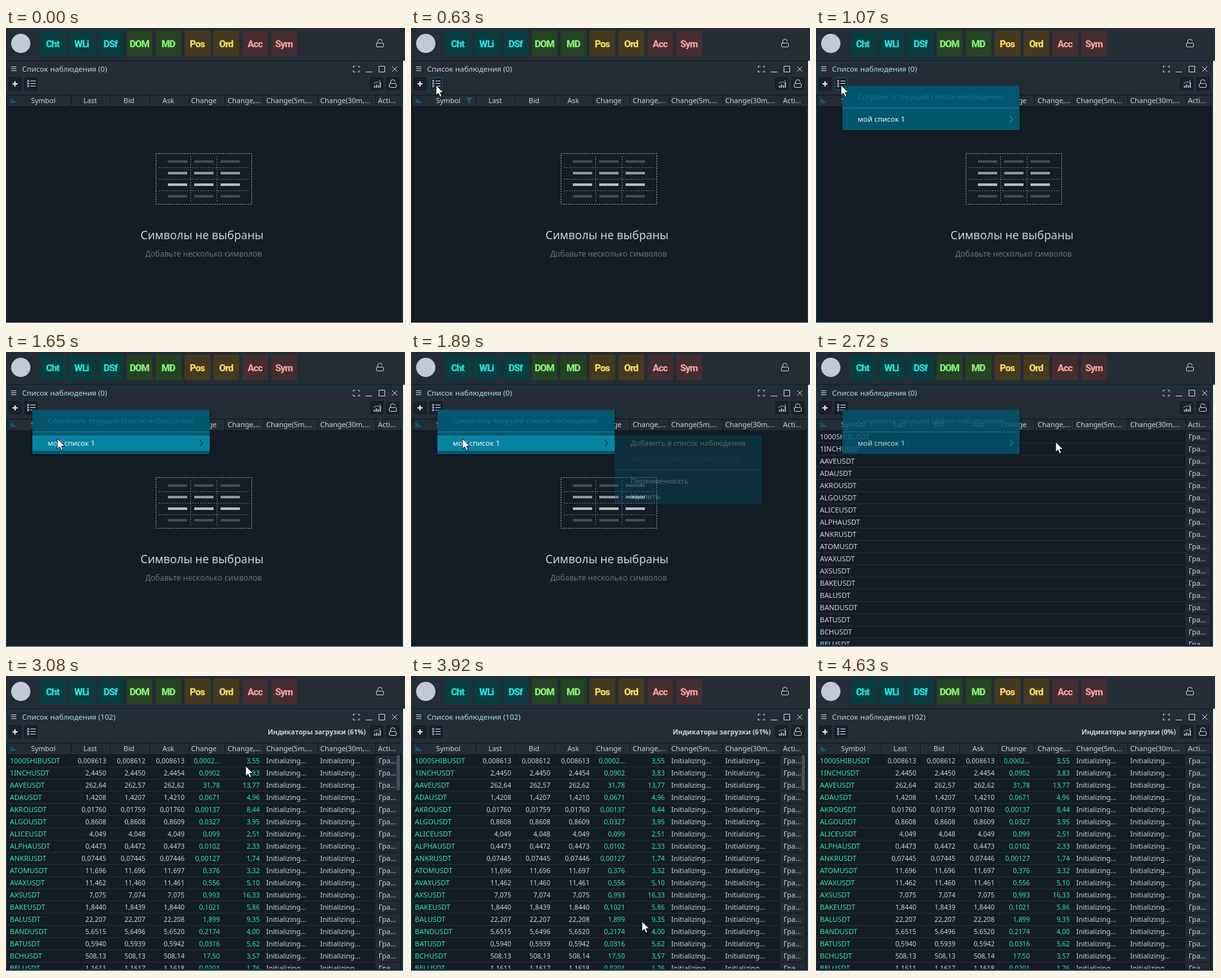
Write an HTML page that moves like this. It is 621 by 461 pixels and loops after 4.71 s.

```html
<!DOCTYPE html>
<html lang="ru">
<head>
<meta charset="utf-8">
<title>Список наблюдения</title>
<style>
html, body { margin: 0; width: 100%; height: 100%; overflow: hidden; background: #fff; }
svg { display: block; }
text { font: 11px "Noto Sans", sans-serif; fill: #cad3dd; white-space: pre; }
.app { font: 900 15px Roboto, sans-serif; letter-spacing: -1px; }
.number { font-size: 10.4px; }
.icon { fill: none; stroke: #c3cdd8; }
.off { fill: #0a7c99; font-size: 11.4px; }
.item { fill: #f2f8fa; font-size: 11.4px; font-weight: 500; }
</style>
</head>
<body>
<svg id="stage" width="621" height="461" viewBox="0 0 621 461"></svg>
<script>
const LOOP = 4710;
const NS = 'http://www.w3.org/2000/svg';
const BAR = '#242c36', BODY = '#141c25', EDGE = '#0f161e', LIGHT = '#cad3dd', GREEN = '#30e6ae';
const stage = document.getElementById('stage');

function add(parent, tag, attrs = {}, content) {
  const el = document.createElementNS(NS, tag);
  for (const key in attrs) el.setAttribute(key, attrs[key]);
  if (content !== undefined) el.textContent = content;
  return parent.appendChild(el);
}
const group = (parent = stage, attrs) => add(parent, 'g', attrs);
const box = (parent, x, y, width, height, fill, extra) =>
  add(parent, 'rect', { x, y, width, height, fill, ...extra });
const stroke = (parent, d, color, extra) =>
  add(parent, 'path', { d, fill: 'none', stroke: color, ...extra });
const label = (parent, x, y, content, extra) => add(parent, 'text', { x, y, ...extra }, content);
const show = (el, alpha) => el.setAttribute('opacity', Number(alpha));
const END = { 'text-anchor': 'end' }, MIDDLE = { 'text-anchor': 'middle' };

// Application bar
box(stage, 0, 0, 621, 51, BAR);
add(stage, 'circle', { cx: 23, cy: 24, r: 15, fill: '#c0cad6' });
const apps = [
  ['#0a3d40', '#25dedd', 'Cht', 'WLi', 'DSf'],
  ['#264224', '#82f472', 'DOM', 'MD'],
  ['#443a20', '#fdd663', 'Pos', 'Ord'],
  ['#432d30', '#f49d9d', 'Acc', 'Sym']
];
let appX = 53;
for (const [back, ink, ...names] of apps) {
  for (const name of names) {
    box(stage, appX, 4, 40, 40, back);
    label(stage, appX + 19.5, 29.5, name, { ...MIDDLE, class: 'app', style: `fill:${ink}` });
    appX += 45;
  }
}
function padlock(x, y) {
  box(stage, x - 5.5, y - .5, 11, 6, 'none', { class: 'icon', rx: 1.5 });
  stroke(stage, `M${x - 3.5} ${y - .5}v-2.500a3.500 3.500 0 0 1 7 0`, LIGHT);
}
padlock(582, 24);

// Window
box(stage, 0, 51, 618, 408, BAR);
box(stage, 1, 104, 615, 353, BODY);
stroke(stage, 'M0 51.5H618', '#10171f');
const frame = box(stage, .5, 52.5, 616, 405, 'none');
stroke(stage, 'M8 60.5h8m-8 3h8m-8 3h8', LIGHT);
const title = label(stage, 25, 68, '', { style: 'font-size:11.6px' });
stroke(stage, 'M540.5 62v-2.5h3m4 0h2.500v2.500m0 4v2.500h-2.500m-4 0h-3v-2.500M560 68.500h10M580.500 59.500h9v9h-9zM601 60l8 8m0-8l-8 8', LIGHT);

// Toolbar
for (const x of [4, 29, 567, 592])
  box(stage, x + .5, 77.5, 19, 19, '#19212b', { stroke: EDGE, rx: 1 });
const pressed = box(stage, 29.5, 77.5, 19, 19, '#19212b', { stroke: '#0c6274', rx: 1 });
stroke(stage, 'M10 87h8m-4-4v8', '#e0e6ec', { 'stroke-width': 2 });
for (const y of [82, 86, 90]) {
  box(stage, 33.5, y - .5, 2, 2, 'none', { stroke: '#b9a9d8' });
  box(stage, 38, y, 8, 1, '#d7dde5');
}
stroke(stage, 'M573.5 93v-3m3 3v-5m3 5v-4m3 4V84', LIGHT, { 'stroke-width': 1.6 });
stroke(stage, 'M572 87l4-3 3 1 4-4', LIGHT, { 'stroke-width': .8 });
padlock(602, 87);
const progress = label(stage, 560, 91, '', { ...END, style: 'font-size:10.4px;font-weight:600' });

// Column headers
box(stage, 1, 104, 615, 19, EDGE);
const edges = [1, 101, 162, 223, 284, 340, 401, 485, 575, 616];
edges.slice(1).forEach((x, i) => box(stage, edges[i] + 1, 105, x - edges[i] - 1, 17, BAR));
add(stage, 'path', { d: 'M7 109v8h11z', fill: '#0c5a6d' });
[['Symbol', 58], ['Last', 131], ['Bid', 191.5], ['Ask', 252.5]]
  .forEach(([name, x]) => label(stage, x, 117, name, MIDDLE));
[['Change', 288], ['Change,...', 345], ['Change(5m,...', 405], ['Change(30m,...', 489], ['Acti...', 579]]
  .forEach(([name, x]) => label(stage, x, 117, name));
const filter = add(stage, 'path', { d: 'M85 108h11l-4 5v5l-3-1v-4z', fill: '#0c6478' });

// Empty state
const empty = group();
box(empty, 233.5, 195.5, 149, 79, 'none', { stroke: '#a3acb7', 'stroke-dasharray': '2 2' });
stroke(empty, 'M238 217.5H379M238 235.5H379M238 253.5H379M287.5 200V271M328.5 200V271',
  '#6a747f', { 'stroke-dasharray': '2 2' });
['#424a54', '#8f969e', '#b5bac1', '#424a54'].forEach((shade, row) => {
  for (const x of [252, 293, 334]) box(empty, x, 206 + row * 18, 30, 4, shade);
});
label(empty, 305, 329, 'Символы не выбраны', { ...MIDDLE, style: 'font-size:17.7px;font-weight:500' });
label(empty, 307.5, 356, 'Добавьте несколько символов',
  { ...MIDDLE, style: 'font-size:12.1px;fill:#69737e' });

// Quotes: symbol, last, bid, ask, change, change %
const quotes = `1000SHIB 0,008613 0,008612 0,008613 0,0002... 3,55
1INCH 2,4450 2,4450 2,4454 0,0902 3,83
AAVE 262,64 262,57 262,62 31,78 13,77
ADA 1,4208 1,4207 1,4210 0,0671 4,96
AKRO 0,01760 0,01759 0,01760 0,00137 8,44
ALGO 0,8608 0,8608 0,8609 0,0327 3,95
ALICE 4,049 4,048 4,049 0,099 2,51
ALPHA 0,4473 0,4472 0,4473 0,0102 2,33
ANKR 0,07445 0,07445 0,07446 0,00127 1,74
ATOM 11,696 11,696 11,697 0,376 3,32
AVAX 11,462 11,460 11,461 0,556 5,10
AXS 7,075 7,074 7,075 0,993 16,33
BAKE 1,8440 1,8439 1,8440 0,1021 5,86
BAL 22,207 22,207 22,208 1,899 9,35
BAND 5,6515 5,6496 5,6520 0,2174 4,00
BAT 0,5940 0,5939 0,5942 0,0316 5,62
BCH 508,13 508,13 508,14 17,50 3,57
BEL 1,1611 1,1617 1,1618 0,0201 1,76`.split('\n').map(line => line.split(' '));
box(add(add(stage, 'defs'), 'clipPath', { id: 'body' }), 1, 123, 615, 333);
const table = group(stage, { 'clip-path': 'url(#body)' });
const names = group(table), values = group(table);
const rights = [156, 217, 278, 333, 395];
quotes.forEach(([coin, ...cells], row) => {
  const y = 136 + row * 19;
  box(table, 1, y + 5, 615, 1, '#262f39');
  box(table, 575, y - 12, 39, 16, '#232b35', { rx: 1 });
  label(table, 580, y, 'Гра...');
  label(names, 6, y, coin + 'USDT', { style: 'fill:inherit' });
  cells.forEach((cell, i) => label(values, rights[i], y, cell,
    { ...END, class: 'number', style: i > 2 ? `fill:${GREEN}` : '' }));
  for (const x of [405, 489]) label(values, x, y, 'Initializing...');
});
const thumb = box(table, 608, 123, 5, 55, '#46505b', { rx: 1 });

// Menus
const menu = group();
box(menu, 40, 90, 279, 71, '#000', { opacity: .25 });
box(menu, 41, 90, 276, 69, '#02566d');
label(menu, 65, 111, 'Сохранить текущий список наблюдения', { class: 'off' });
stroke(menu, 'M41 124.5H317', '#1a86a0');
const itemHot = box(menu, 41, 130, 276, 24, '#0783a2');
label(menu, 65, 146, 'мой список 1', { class: 'item' });
const chevron = stroke(menu, 'M302 137.5l4 4.5-4 4.5', '', { 'stroke-width': 2 });

const submenu = group();
box(submenu, 317, 130, 231, 109, '#000', { opacity: .25 });
box(submenu, 317, 130, 229, 107, '#02566d');
const addHot = box(submenu, 317, 130, 229, 24, '#0783a2');
label(submenu, 342, 146, 'Добавить в список наблюдения', { class: 'item' });
label(submenu, 342, 170, 'Заменить список наблюдения', { class: 'off' });
stroke(submenu, 'M317 183.5H546', '#1a86a0');
label(submenu, 342, 205, 'Переименовать', { class: 'item' });
label(submenu, 342, 229, 'Удалить', { class: 'item' });

const cursor = add(stage, 'path', {
  d: 'M0 0V16L3.700 12.500 6.200 18.300 8.800 17.200 6.400 11.500H11.500Z',
  fill: '#fff', stroke: '#000', 'stroke-width': .9
});

// Number of picture changes passed out of count, spread evenly from start to end
function stepsDone(t, start, end, count) {
  const k = Math.floor((t - start) / (end - start) * (count - 1) + .02) + 1;
  return Math.max(0, Math.min(count, k));
}
const easeOut = p => 1 - (1 - p) ** 1.8;
const between = (a, b, p) => a.map((v, i) => v + (b[i] - v) * p);

const ENTRY = [346, 374], BUTTON = [39, 89], ITEM = [80, 135], ADD = [373, 140], EXIT = [355, 458];

function pointerAt(t) {
  if (t < 1290) return between(ENTRY, BUTTON, easeOut(Math.max(0, stepsDone(t, 60, 550, 8) - 1) / 7));
  if (t < 2120) return between(BUTTON, ITEM, easeOut(stepsDone(t, 1290, 1650, 6) / 6));
  if (t < 3560) return between(ITEM, ADD, easeOut(stepsDone(t, 2120, 2490, 6) / 6));
  return between(ADD, EXIT, (stepsDone(t, 3560, 4000, 7) / 6) ** 1.5);
}

function render(t) {
  const opening = stepsDone(t, 630, 1070, 7);
  const loading = stepsDone(t, 2720, 3080, 6);
  const leaving = stepsDone(t, 4390, 4630, 4);
  const [x, y] = pointerAt(t);
  const loaded = loading >= 4, focused = opening > 1 && leaving < 2;

  cursor.setAttribute('transform', `translate(${x.toFixed(1)} ${y.toFixed(1)})`);
  show(cursor, t >= 60 && t < 4000);
  show(filter, t >= 480 && t < 780);
  show(pressed, t >= 550 && t < 1290);

  frame.setAttribute('stroke', focused ? '#0a4656' : BAR);
  title.style.fill = focused ? '#a3e4f0' : LIGHT;
  title.textContent = `Список наблюдения (${loaded ? 102 : 0})`;
  const percent = leaving ? 0 : [0, 30, 61][Math.max(0, loading - 4)];
  progress.textContent = loaded ? `Индикаторы загрузки (${percent}%)` : '';

  show(empty, !loading);
  show(table, loading > 0);
  show(values, loaded);
  names.setAttribute('fill', loaded ? GREEN : LIGHT);
  show(thumb, loading > 4 ? 1 - leaving / 4 : 0);

  show(menu, loading ? [0, .82, .4][loading] || 0 : Math.max(0, opening - 2) / 5);
  const hot = t > 1290 && y >= 130 && !loading;
  show(itemHot, hot);
  chevron.setAttribute('stroke', hot ? '#06485b' : '#0783a2');
  show(submenu, loading ? 0 : stepsDone(t, 1820, 1970, 3) / 3);
  show(addHot, t > 1970 && x >= 317);
}

const start = performance.now();
function tick() {
  render((performance.now() - start) % LOOP);
  requestAnimationFrame(tick);
}
tick();
</script>
</body>
</html>
```
